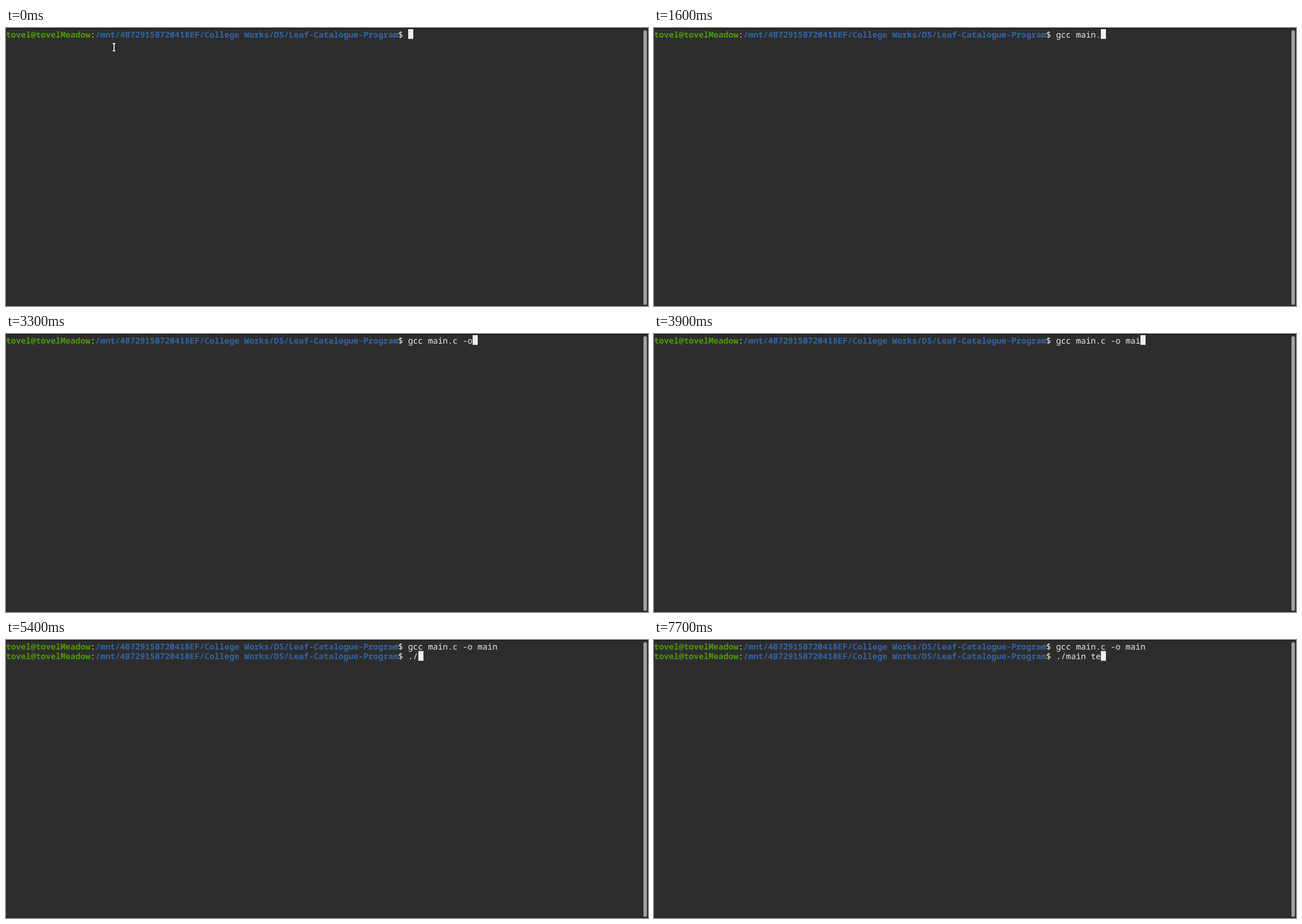
An HTML page for the animation above (8 s loop, 1135 by 493 pixels).

```html
<!DOCTYPE html>
<html lang="en">
<head>
<meta charset="utf-8">
<title>Terminal</title>
<style>
  html, body { margin: 0; width: 100%; height: 100%; overflow: hidden; background: #2d2d2d; }
  svg { display: block; width: 1135px; height: 493px; }
  text {
    font: 14.63px "Noto Sans Mono", "DejaVu Sans Mono", monospace;
    fill: #eeeeec;
    white-space: pre;
    text-rendering: geometricPrecision;
  }
  .user, .path { font-weight: 700; }
  .user { fill: #4e9a06; }
  .path { fill: #3465a4; }
</style>
</head>
<body>
<svg viewBox="0 0 1135 493">
  <defs>
    <path id="beam" d="M188.5 27.5h1.5l1 1l1-1h1.5M191 28.5v11M188.5 40.5h1.5l1-1l1 1h1.5"/>
  </defs>
  <rect width="1135" height="493" fill="#2d2d2d"/>
  <rect width="1135" height="1" fill="#0c0c0c"/>
  <rect x="1127" y="4" width="6" height="487" rx="3" fill="#a2a2a1"/>
  <g id="lines"></g>
  <rect id="cursor" width="9" height="17.3" fill="#eeeeec"/>
  <g id="pointer" fill="none">
    <use href="#beam" stroke="#161616" stroke-width="3.6" stroke-linecap="square"/>
    <use href="#beam" stroke="#fff" stroke-width="1.8"/>
  </g>
</svg>
<script>
  const LOOP = 8000, CELL = 8.778, ROW = 17.55;
  const USER = "tovel@tovelMeadow";
  const PATH = "/mnt/4B72915B720418EF/College Works/DS/Leaf-Catalogue-Program";
  const PROMPT_LENGTH = USER.length + PATH.length + 3;
  const COMMANDS = ["gcc main.c -o main", "./main te"];

  // Typing per row: [time, characters shown]
  const TYPING = [
    [[0, 0], [200, 1], [600, 2], [800, 4], [900, 5], [1100, 6], [1200, 8],
     [1600, 9], [1700, 10], [1800, 11], [3000, 12], [3300, 13],
     [3600, 14], [3700, 15], [3900, 17], [4000, 18]],
    [[4400, 0], [5300, 1], [5400, 2], [5600, 3], [5800, 5], [6000, 7], [7700, 9]]
  ];
  const ENTER = 4300, PROMPT_BACK = 4400, POINTER_HIDES = 100;
  const BLINKS = [[2300, 2900], [4800, 5300], [6700, 7300]];

  const byId = id => document.getElementById(id);
  const cursor = byId("cursor"), pointer = byId("pointer");

  function addSpan(parent, content, className = "") {
    const span = document.createElementNS(parent.namespaceURI, "tspan");
    span.setAttribute("class", className);
    span.textContent = content;
    parent.append(span);
    return span;
  }

  function addLine(row) {
    const line = document.createElementNS(cursor.namespaceURI, "text");
    line.setAttribute("x", 0);
    line.setAttribute("y", 16.5 + row * ROW);
    byId("lines").append(line);
    addSpan(line, USER, "user");
    addSpan(line, ":");
    addSpan(line, PATH, "path");
    addSpan(line, "$ ");
    return { line, command: addSpan(line, "") };
  }

  const lines = COMMANDS.map((_, row) => addLine(row));
  const show = (node, on) => node.setAttribute("visibility", on ? "visible" : "hidden");

  function typedAt(row, t) {
    const step = TYPING[row].findLast(([start]) => t >= start);
    return step ? step[1] : 0;
  }

  function draw(t) {
    lines.forEach(({ command }, row) => {
      const text = COMMANDS[row].slice(0, typedAt(row, t));
      if (command.textContent !== text) command.textContent = text;
    });
    const row = t < ENTER ? 0 : 1;
    const waiting = t >= ENTER && t < PROMPT_BACK;
    const column = waiting ? 0 : PROMPT_LENGTH + typedAt(row, t);
    cursor.setAttribute("x", Math.round(column * CELL));
    cursor.setAttribute("y", 2 + row * ROW);
    show(cursor, !BLINKS.some(([off, on]) => t >= off && t < on));
    show(lines[1].line, t >= PROMPT_BACK);
    show(pointer, t < POINTER_HIDES);
  }

  function frame() {
    draw(performance.now() % LOOP);
    requestAnimationFrame(frame);
  }
  frame();
</script>
</body>
</html>
```
